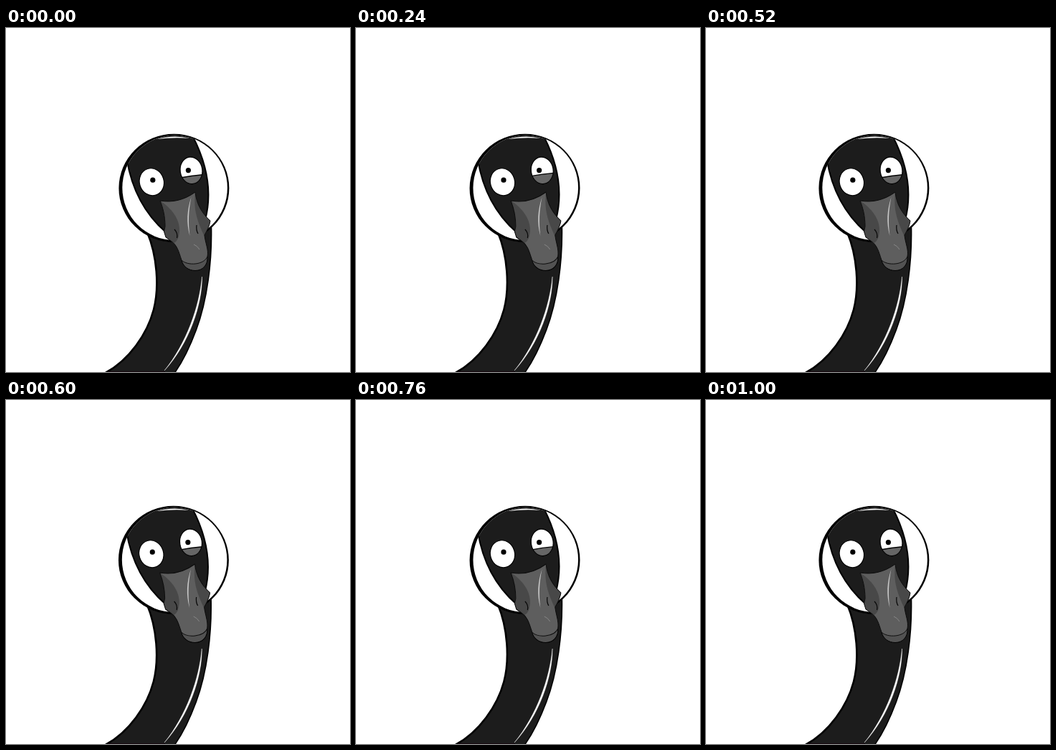
These frames come from a looping animation (480x480 px, 1040 ms). An HTML page with a canvas:

```html
<!DOCTYPE html>
<html lang="en">
<head>
<meta charset="utf-8">
<title>Swaying goose</title>
<style>
html, body { margin: 0; width: 100%; height: 100%; overflow: hidden; background: #fff; }
canvas { display: block; width: 480px; height: 480px; }
</style>
</head>
<body>
<canvas id="stage" width="480" height="480"></canvas>
<script>
const ctx = document.getElementById('stage').getContext('2d');
const LOOP = 1040, STEP = 40;
const INK = '#000', SKIN = '#1c1c1c', WHITE = '#fff';

// [step, value] pairs, eased between
const SWAY = [[0, 0], [2, -0.5], [4, 0.4], [6, 1.15], [8, -0.35], [10, -1], [12, 0], [13, 0]];
const LID = [[0, 0], [3, 0], [6, 1], [10, 1], [13, 0], [19, 0], [21, 1], [23, 0], [26, 0]];

function ease(keys, n) {
  let i = 0;
  while (i < keys.length - 2 && n >= keys[i + 1][0]) i++;
  const [a, from] = keys[i], [b, to] = keys[i + 1];
  const k = (1 - Math.cos(Math.PI * (n - a) / (b - a))) / 2;
  return from + (to - from) * k;
}

function paint(path, fill, line, width = 1) {
  if (fill) { ctx.fillStyle = fill; ctx.fill(path); }
  if (line) { ctx.strokeStyle = line; ctx.lineWidth = width; ctx.stroke(path); }
}

function shape(d, fill, line, width) {
  paint(new Path2D(d), fill, line, width);
}

function oval(x, y, rx, ry, tilt = 0) {
  const p = new Path2D();
  p.ellipse(x, y, rx, ry, tilt, 0, Math.PI * 2);
  return p;
}

function inside(path, draw) {
  ctx.save();
  ctx.clip(path);
  draw();
  ctx.restore();
}

function drawNeck() {
  const left = 'M197 285C211 318 214 362 206 393C197 427 172 463 139 481';
  const right = 'C249 462 257 444 265.5 421C281 380 287.5 325 286.5 278';
  shape(left + 'L235.5 481' + right + 'Z', SKIN);
  shape('M235.5 481' + right, null, INK, 1.6);
  shape(left, null, INK, 2.6);
  shape('M273.5 347C274 385 256 440 221 478C252 440 270 388 273.5 347Z', WHITE, WHITE, 0.4);
  shape('M142 479.5H222', null, '#170810', 1);
}

function drawHead() {
  const inner = oval(235.6, 223, 73.3, 73.2);
  paint(oval(234.4, 223.4, 77, 75.6), INK);
  paint(inner, WHITE);
  inside(inner, () => shape(
    'M168.5 183C175 222 192 258 223 285L252 296L278 268C289 225 278 185 261 152L240 140L160 140Z',
    SKIN, INK, 2));
  shape('M210.5 155Q235 148.5 256 154Q235 152 210.5 155Z', WHITE);
}

function drawEyes(lid) {
  paint(oval(203.3, 214.8, 17, 19.2, -0.3), WHITE, INK, 1.2);
  paint(oval(204.8, 212.2, 3.6, 3.6), INK);

  const eye = oval(258.5, 198.8, 15.4, 18.8, -0.15);
  paint(eye, WHITE);
  paint(oval(254.4, 198.6, 3.6, 3.6), INK);
  inside(eye, () => {
    const l = 209.6 - 2.4 * lid, r = 204.6 - 2.4 * lid;
    shape(`M240 ${l}Q258 ${(l + r) / 2 - 1} 276 ${r}V222H240Z`, '#666', INK, 1.3);
  });
  paint(eye, null, INK, 1.2);
}

function drawBeak() {
  // lower bill
  shape('M245 324C247 333 255 338.5 264 338.5C275 338.5 282 330 281 319Z', '#525252', INK, 1);

  const bill = new Path2D('M215 241C232 244 249 240 264 229C266 247 274 259 285 269' +
    'C284 277 280 283 277 289C278 300 283 309 281 319C276 331 253 332 245 324' +
    'C241 312 239 303 230 297L223 292L220.5 284L222 277C222 262 219 251 215 241Z');
  paint(bill, '#5e5e5e');
  inside(bill, () => {
    shape('M212 239C230 250 243 266 242 284C241 295 238 298 233 301L212 300Z', '#484848');
    shape('M264 227C262 251 264 264 277 291L292 270Z', '#484848');
  });
  paint(bill, null, '#0c0c0c', 1);

  shape('M258.5 236C252.5 254 251.5 272 256.5 290C254 272 254.5 255 258.5 236Z', '#c8c8c8');
  shape('M262 302Q267 304 270 309', null, '#8c8c8c', 0.9);
  shape('M235 281Q240 286 238.5 293', null, '#080808', 1.2);
  shape('M266 275Q265 282 268 287', null, '#080808', 1.2);
}

function render(time) {
  const n = Math.floor((time % LOOP) / STEP);
  const lean = ease(SWAY, n % 13) / 260;
  ctx.setTransform(1, 0, 0, 1, 0, 0);
  ctx.fillStyle = WHITE;
  ctx.fillRect(0, 0, 480, 480);
  // the foot of the neck stays put while the head leans
  ctx.setTransform(1, 0, -lean, 1, lean * 480, 0);
  ctx.lineJoin = 'round';
  drawNeck();
  drawHead();
  drawEyes(ease(LID, n));
  drawBeak();
}

const start = performance.now();
function tick() {
  render(performance.now() - start);
  requestAnimationFrame(tick);
}
tick();
</script>
</body>
</html>
```
